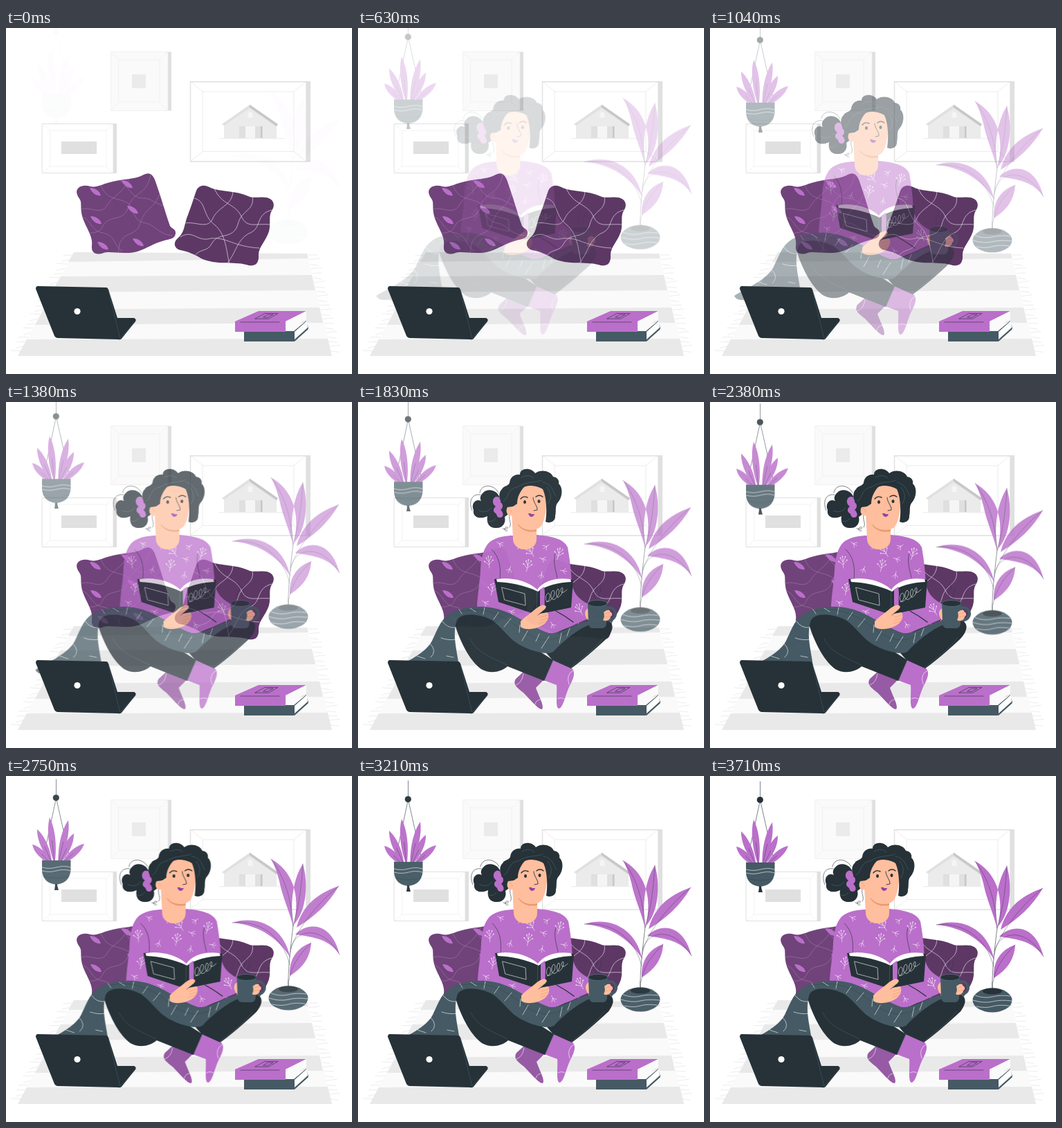
An HTML page that plays this animation: 500 px wide and 500 px high, repeating every 3750 ms.

```html
<!DOCTYPE html>
<html lang="en">
<head>
<meta charset="utf-8">
<title>Reading at home</title>
<style>
html, body { margin: 0; width: 100%; height: 100%; overflow: hidden; background: #fff; }
svg { display: block; width: 100vw; height: 100vh; }
path { stroke-linecap: round; stroke-linejoin: round; }
.plant { animation: drop 3750ms infinite; }
.woman { animation: slide 3750ms infinite; }
@keyframes drop {
  0% { opacity: .02; transform: translateY(-29.4px); animation-timing-function: ease-out; }
  100% { opacity: 1; transform: none; }
}
@keyframes slide {
  0% { opacity: 0; transform: translateX(-30px); animation-timing-function: cubic-bezier(.36, -.01, .5, 1.38); }
  75.6%, 100% { opacity: 1; transform: none; }
}
.ink { fill: #263238; }
.slate { fill: #455a64; }
.lilac { fill: #ba6fca; }
.skin { fill: #ffbe9d; }
.line, .white, .soft, .pale { fill: none; stroke-width: .6; }
.line { stroke: #263238; }
.white { stroke: #fff; }
.soft { stroke: #e0e0e0; }
.pale { stroke: #ebebeb; }
.line.grey { stroke: #607d8b; }
.line.tan { stroke: #e99a70; }
.line.bold { stroke-width: 1.4; }
.line.fine { stroke-width: .4; }
</style>
</head>
<body>
<svg viewBox="0 0 500 500">
  <defs>
    <path id="cushionL" d="M103 241C99 231 110 225 122 229C131 231 138 226 150 223C166 218 185 219 197 213C206 208 211 210 215 219C223 241 230 266 237 286C239 290 246 290 245 297C244 305 236 305 229 307C213 311 205 318 190 323C172 328 150 322 141 325C130 329 123 325 124 315C126 303 118 292 113 280C107 267 109 257 108 251C107 246 104 245 103 241Z"/>
    <path id="cushionR" d="M275 235C279 226 288 226 296 231C310 237 333 235 350 243C358 247 366 243 377 245C388 248 389 257 384 264C379 272 383 282 380 294C375 309 365 316 365 328C366 341 359 346 347 342C330 337 303 343 282 333C271 326 262 323 252 321C243 319 241 310 248 304C259 295 257 284 263 270C268 256 272 244 275 235Z"/>
    <clipPath id="clipL"><use href="#cushionL"/></clipPath>
    <clipPath id="clipR"><use href="#cushionR"/></clipPath>
  </defs>

  <!-- rug -->
  <path fill="#fafafa" d="M98 324L435 326L471 474H17Z"/>
  <path fill="#e9e9e9" d="M98 324L435 326L437 333L90 338ZM79 359L442 357L447 379L66 382ZM54 407L453 404L458 426L42 429ZM30 450L465 449L471 474H17Z"/>
  <g id="fringe" class="soft"></g>

  <!-- pictures -->
  <path fill="#e0e0e0" d="M233 34.500H239V119.500H233ZM155 138H160V210H155ZM433 77H440V193.500H433Z"/>
  <path fill="#fafafa" stroke="#ebebeb" stroke-width=".6" d="M152 34.500H234V119.500H152Z"/>
  <path class="pale" d="M163 46H222V107H163ZM152 34.500L163 46M234 34.500L222 46M152 119.500L163 107M234 119.500L222 107"/>
  <path fill="#ebebeb" d="M182 67H202V87H182Z"/>
  <path fill="#fff" stroke="#e0e0e0" d="M52.500 138.500H155V209.500H52.500Z"/>
  <path class="pale" d="M64 148H145V200H64ZM52 138L64 148M155 138L145 148M52 210L64 200M155 210L145 200"/>
  <path fill="#e0e0e0" d="M80 164H131V182H80Z"/>
  <path fill="#fff" stroke="#e0e0e0" stroke-width="1.400" d="M266.500 77.700H434V193H266.500Z"/>
  <path class="soft" d="M284.500 92H416V178.500H284.500ZM266 77L284.500 92M434 77L416 92M266 193L284.500 178.500M434 193L416 178.500M308 159.700H403"/>
  <path fill="#ebebeb" d="M315 139L352 113L391 140V159.500H315Z"/>
  <path fill="#e0e0e0" d="M312 139L352 111L392 139L390 142L352 116L315 141ZM337 142H370V159H337Z"/>
  <path fill="#c7c7c7" d="M352 110.500L393 139L391 142L352 114.500ZM368 142H370.500V159H368Z"/>
  <path fill="#f5f5f5" d="M346 142H360V159H346ZM349.500 130V124Q353 118 356.500 124V130Z"/>

  <!-- cushions -->
  <use href="#cushionL" fill="#70437a"/>
  <g clip-path="url(#clipL)">
    <path fill="none" stroke="#a878b1" stroke-width=".6" d="M137 228C148 250 158 244 174 252C188 260 180 278 202 282C216 285 220 298 240 300M178 217C168 242 155 240 145 258C134 272 118 254 106 264M209 212C204 242 184 236 177 258C170 282 150 268 140 286C134 300 120 293 112 300M222 240C214 262 202 258 194 282C188 302 172 292 164 312L162 326M108 272C126 278 121 293 140 296C160 301 153 312 168 322M163 219C181 232 180 246 200 246C212 247 215 254 228 257"/>
    <g id="cushionLeaves" class="lilac"></g>
  </g>
  <use href="#cushionR" fill="#5d3865"/>
  <path clip-path="url(#clipR)" fill="none" stroke="#e6d9e8" stroke-width=".7" d="M272 246C290 250 283 270 301 284C318 298 318 320 323 342M301 232C312 257 330 252 340 272C348 290 360 282 382 284M328 236C327 258 306 257 298 277C290 291 274 279 258 282M356 243C360 265 340 262 335 284C328 307 306 294 297 312C291 324 280 318 272 330M384 263C360 269 370 289 353 296C333 305 333 326 318 342M252 302C270 290 276 310 296 304C320 302 328 316 366 318"/>

  <!-- hanging plant -->
  <g class="plant">
    <path class="line" d="M72.500 8V35L53 126M72.500 35L93 126"/>
    <circle class="ink" cx="72.300" cy="34.500" r="4.600"/>
    <g id="hangingLeaves"></g>
    <path class="ink" d="M70 157H75L74 161L76 168H70L71 161Z"/>
    <path class="slate" d="M52 125H93.500V140C92 153 83 159.500 72.500 159.500C62 159.500 53 153 52 140Z"/>
    <path class="white" d="M52 135Q62 138 73 135T93 135M52 140Q62 143 73 140T93 140"/>
    <path class="line" d="M54 148Q73 154 91 148" opacity=".5"/>
  </g>

  <!-- potted plant -->
  <g class="plant">
    <path class="lilac" d="M383 123C411 138 428 172 415 221C409 196 400 180 395 155C391 140 388 132 383 123ZM429 130C416 150 410 182 415 219C435 198 437 158 429 130ZM481 162C448 173 427 193 420 222C445 207 466 188 481 162ZM418 232C436 214 470 213 482 261C467 239 446 236 418 232ZM327 215C362 204 401 219 411 266C396 241 370 219 327 215ZM441 244C420 251 409 268 410 292C430 280 440 264 441 244Z"/>
    <path class="line fine" d="M383 123C402 148 412 178 415 219M429 130C427 160 425 185 415 219M411 258C413 238 440 195 481 162M411 253C418 224 456 217 482 261M327 215C366 211 400 234 410 276M409 298C413 275 425 260 441 244"/>
    <path class="line" d="M408 311C407 282 412 245 415 219"/>
    <ellipse class="slate" cx="408" cy="324" rx="28.500" ry="17.500"/>
    <ellipse class="ink" cx="408" cy="311" rx="14" ry="4.500"/>
    <path class="white" d="M383 317Q396 322 408 319T434 318M380 324Q396 329 408 326T436 325M385 333Q398 336 408 333T432 332"/>
    <path class="line" d="M408 311V298"/>
  </g>

  <!-- woman -->
  <g class="woman">
    <path class="ink" d="M206 139C203 127 188 124 182 131C177 135 177 140 179 143C170 139 164 148 168 156C166 167 178 170 188 165C186 176 192 183 201 182C211 182 215 174 213 166L221 160L217 140Z"/>
    <path class="line" d="M204 131C197 118 179 118 177 131M166 157C160 143 166 132 178 134M210 183C217 186 220 180 215 181C211 182 213 188 217 186M220 163C218 170 224 176 220 181"/>
    <path class="lilac" d="M200 137C205 136 209 140 207 145C212 148 210 154 207 156C212 160 212 167 206 167C201 167 202 162 200 161C195 158 197 153 200 151C194 147 195 139 200 137Z"/>

    <path fill="#975aa5" d="M240 390L229 400C224 408 231 413 240 420C250 430 261 444 267 444C271 440 262 425 258 413L270 401Z"/>
    <path class="white" d="M229 409Q238 406 240 393M257 437Q258 431 264 430"/>
    <path class="lilac" d="M282 373L309 384C316 389 313 398 308 408C301 420 298 443 291 443C286 441 289 422 288 409L269 402Z"/>
    <path class="white" d="M312 388Q301 394 306 408M289 429Q294 426 299 429"/>

    <path class="lilac" d="M225 193C215 193 202 195 193 201C181 210 179 229 178 243C177 263 173 282 173 299L216 325L270 343L320 319L334 313L336 293C323 287 313 279 310 263C309 245 307 226 304 210C298 197 280 194 260 192Z"/>
    <path class="line" d="M194 213C205 223 208 238 206 257M286 219C282 231 287 243 289 254"/>
    <path class="line bold" d="M287 302Q300 309 312 318"/>
    <g id="sprigs" class="white" opacity=".85"></g>

    <path class="skin" d="M223 160L225 198C225 207 233 213 242 213C252 213 259 207 259 198V180Z"/>
    <path fill="#e99a70" d="M231 176C240 182 249 186 259 184V187C247 189 237 186 231 176Z"/>
    <path class="skin" d="M226 112H268C276 136 274 163 267 177C262 187 246 187 237 181L225 168Z"/>
    <ellipse class="skin" cx="221" cy="157" rx="5.500" ry="7.500"/>
    <path class="line tan" d="M218 154Q222 154 223 159"/>
    <path class="ink" d="M217 152C203 145 203 131 209 126C211 121 218 122 220 117C221 106 231 104 235 105C235 95 251 94 257 103C265 97 279 99 283 108C290 109 292 114 291 118C298 124 296 138 290 145C285 150 288 158 286 164C287 173 277 176 272 173C274 160 274 139 268 126C262 122 249 119 241 123C236 128 231 137 231 147L225 151Z"/>
    <path class="line grey fine" d="M211 143C220 139 215 126 231 123C245 114 257 117 267 113M237 109Q248 103 255 110M268 116C283 119 283 132 287 136M274 123Q284 135 276 147M176 157Q187 162 194 153M188 171Q194 176 200 168"/>
    <ellipse class="ink" cx="242" cy="144.500" rx="2" ry="2.600"/>
    <ellipse class="ink" cx="262.500" cy="143.500" rx="2" ry="2.600"/>
    <path class="line bold" d="M236 140Q240 135 246 138M258 137Q263 133 268 137"/>
    <path class="line" d="M254 138C254 145 261 151 260 156L255 157" style="stroke-width:.9"/>
    <path fill="#8e44a3" d="M247 161Q250 160 252 162L256 162Q255 166 251 166Q248 165 247 161Z"/>

    <path class="ink" d="M262 350C284 330 327 316 361 316C373 319 370 333 358 344C343 358 324 374 309 385L282 373Z"/>
    <path class="ink" d="M141 321C141 306 160 302 184 308C208 322 239 345 283 373L270 403L217 382C207 391 191 393 179 386C161 373 147 342 141 321Z"/>
    <path class="line" style="stroke:#455a64" d="M163 342C172 362 194 369 216 380M283 373L270 403M308 384C329 367 346 355 356 340"/>
    <path class="slate" d="M51 387C72 374 98 364 108 345C116 329 120 314 135 305C151 296 174 294 193 297C225 302 247 324 277 334C297 335 312 321 331 317L350 317C326 322 302 341 283 361C273 366 252 360 239 353C218 344 209 323 192 314C172 305 147 304 143 318C137 340 145 361 148 390L60 393Q53 392 51 387Z"/>
    <path class="white" d="M123 317Q130 327 141 326M105 349Q116 360 106 369M121 341Q132 345 143 343M86 367L98 371M147 300L151 306M163 298L171 303M184 297L182 307M204 304L197 314M222 313L212 325M235 322L234 333M246 331L238 345M263 335L258 346M277 339L266 356M295 334L292 348M307 327L303 338M129 367L139 369"/>
    <path class="line fine" d="M147 303C189 293 215 312 240 331C267 351 289 345 304 331" opacity=".6"/>

    <path class="ink" d="M198 256C216 254 242 259 260 272C271 260 291 255 312 257L309 297L265 306L258 307L204 289Z"/>
    <path fill="#fff" d="M201 256C220 253 244 257 260 271C269 258 288 253 308 256L309 260C291 261 272 265 261 274C243 265 222 261 202 260Z"/>
    <path class="line grey fine" d="M260 271L259 306"/>
    <path class="white" d="M209 268L242 277L243 294L213 286ZM273 289C279 288 280 277 276 276C271 278 271 291 277 288C285 283 287 274 283 272C278 275 279 288 285 285C292 281 293 272 290 270C286 273 287 286 292 281C297 277 298 269 296 268C292 271 294 281 303 271"/>
    <path class="lilac" d="M264 271L270 267C272 277 270 288 271 296L264 294Z"/>
    <path class="skin" d="M236 317C243 310 249 306 254 302C260 297 266 292 271 294C274 295 273 298 269 301L263 306L275 304C278 309 276 318 267 323C256 329 243 330 236 325Z"/>
    <path class="line" d="M261 308Q266 303 274 302"/>
    <path class="line tan" d="M265 311L275 308M264 316L275 312M263 320L273 317"/>

    <path class="skin" d="M335 298C329 299 328 305 330 310C331 315 338 318 341 315V299Z"/>
    <path class="slate" d="M333 291H361L360 321Q359 327 353 327H341Q335 327 334 321Z"/>
    <circle cx="364" cy="306" r="9" fill="none" stroke="#455a64" stroke-width="4"/>
    <ellipse class="ink" cx="347" cy="291" rx="14" ry="4.500"/>
    <ellipse class="line grey" cx="347" cy="291" rx="14" ry="4.500"/>
    <path class="skin" d="M356 304C361 299 366 300 365 303C369 304 369 309 366 310C366 315 359 318 355 315Q358 310 356 304Z"/>
    <path class="line tan" d="M358 306L365 304M358 311L366 309"/>
    <path class="line" d="M344 284C337 273 351 273 345 263M350 284C345 277 355 275 351 268" opacity=".65"/>
  </g>

  <!-- laptop -->
  <path class="ink" d="M46 373L145 375Q147 375 148 378L161 419L185 419Q189 421 187 424L167 449Q165 451 162 450L74 448Q71 447 70 445L43 377Q43 373 46 373Z"/>
  <path d="M148 379L165 449L187 424" fill="none" stroke="#455a64" stroke-width=".6"/>
  <circle cx="103" cy="409.500" r="4.600" fill="#fff"/>

  <!-- books -->
  <path class="slate" d="M344 438H416L434 423L437 434L416 453H344Z"/>
  <path fill="#fff" d="M417 439L435 423L436 433L417 450Z"/>
  <path d="M417 452L436 435" stroke="#455a64" stroke-width="1.500"/>
  <path class="lilac" d="M331 424L365 409H434L404 424V439H331Z"/>
  <path fill="#fafafa" d="M404 424L434 409V421L404 437Z"/>
  <path class="line" d="M339 425H395M360 420L374 412.500H393L380 420ZM372 418L378 414H386L379 418Z"/>
</svg>
<script>
const put = (id, html) => document.getElementById(id).innerHTML = html;

// Lance-shaped leaf between two points, widest past its middle
function leaf(x0, y0, x1, y1, w) {
  const dx = x1 - x0, dy = y1 - y0, len = Math.hypot(dx, dy);
  const at = (f, side) => `${x0 + dx * f - dy / len * side} ${y0 + dy * f + dx / len * side}`;
  return `<path d="M${x0} ${y0}C${at(.35, w)} ${at(.75, w)} ${x1} ${y1}C${at(.75, -w)} ${at(.35, -w)} ${x0} ${y0}Z"/>`;
}

put('hangingLeaves', [[38, 102], [113, 101], [45, 80], [98, 86], [63, 63], [90, 67]].map(([x, y]) => {
  const base = 72 + (x - 72) * .2;
  return `<g class="lilac">${leaf(base, 130, x, y, 6.5)}</g>` +
    `<path class="line fine" d="M${base} 130L${(x + base) / 2} ${(y + 130) / 2}"/>`;
}).join(''));

put('cushionLeaves', [[121, 231], [167, 220], [175, 257], [122, 272], [132, 309], [183, 304]].map(([x, y]) =>
  leaf(x, y, x + 16, y + 11, 4.5)).join(''));

let fringe = '';
for (let i = 0; i < 22; i++) {
  const y = 328 + i * 6.6, k = (y - 324) / 150, sway = Math.sin(i * 2.3) * 2;
  const left = 97 - 80 * k, right = 436 + 35 * k;
  fringe += `<path d="M${left} ${y}l${-12 + sway} ${1 + sway}M${right} ${y}l${13 + sway} ${-sway}"/>`;
}
put('fringe', fringe);

const sprig = ([x, y, turn]) => `<g transform="translate(${x} ${y}) rotate(${turn})">
  <path d="M0 9Q1 3 0 -7M0 4L-6 -1M0 4L6 -2M0 0L-3 -5M0 0L4 -6"/>
  <g fill="#fff" stroke="none"><circle cx="-6" cy="-1" r=".9"/><circle cx="6" cy="-2" r=".9"/>
  <circle cx="-3" cy="-6" r=".9"/><circle cx="4" cy="-7" r=".9"/><circle cy="-8" r=".9"/></g></g>`;
const twig = ([x, y, turn]) =>
  `<path transform="translate(${x} ${y}) rotate(${turn})" d="M-5 0H5M-1 0L3 -4M-1 0L3 4"/>`;
put('sprigs',
  [[190, 231, -5], [246, 236, 10], [291, 219, 15], [250, 216, -35], [195, 270, 10], [321, 300, -30]].map(sprig).join('') +
  [[234, 208, 60], [273, 209, 145], [220, 242, 110], [268, 227, 20], [298, 244, 10], [185, 290, 30], [266, 250, 100],
    [223, 303, 20], [282, 322, 60], [206, 205, 30]].map(twig).join(''));
</script>
</body>
</html>
```
